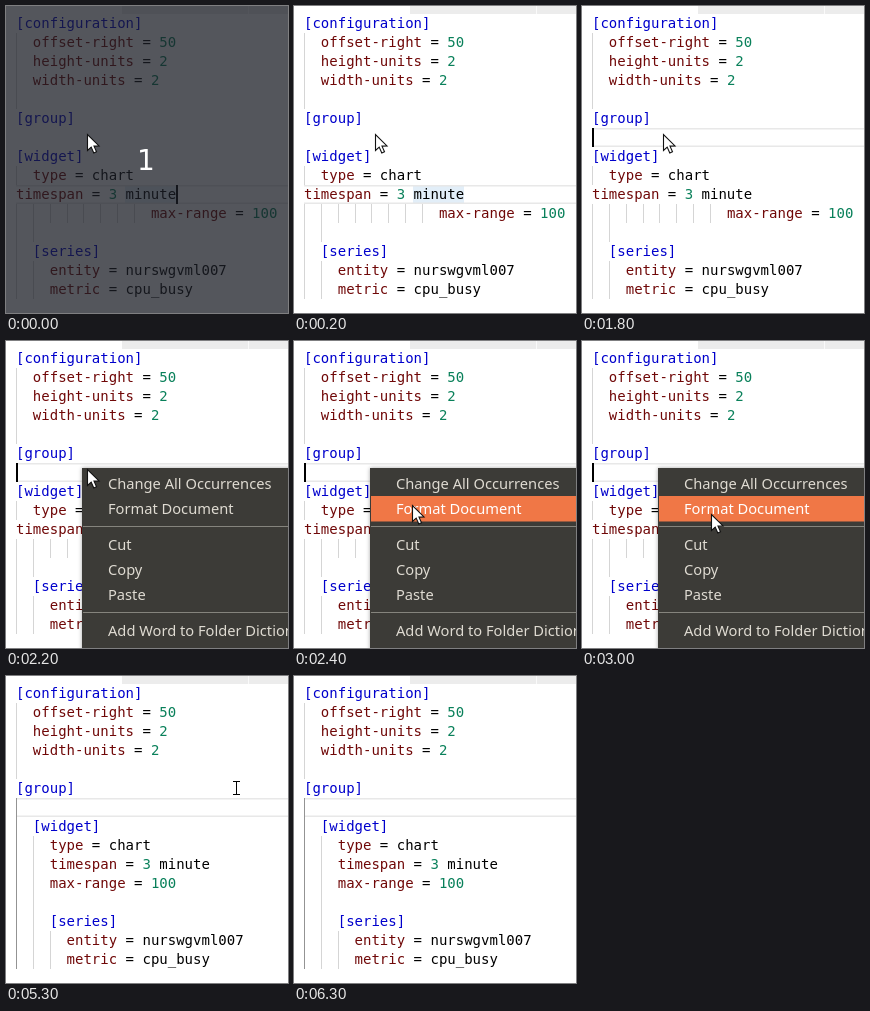
Recreate the animation shown at these times as an HTML page with a canvas. Size 282 by 307 pixels, loop 6600 ms.

```html
<!DOCTYPE html>
<html lang="en">
<head>
<meta charset="utf-8">
<title>Format document</title>
<style>
html, body { margin: 0; width: 100%; height: 100%; overflow: hidden; background: #fff; }
canvas { display: block; width: 282px; height: 307px; }
</style>
</head>
<body>
<canvas id="stage" width="282" height="307"></canvas>
<script>
const W = 282, H = 307, LOOP = 6600;
const LEFT = 10, TOP = 8, ROW = 19, CH = 8.43;
const MONO = '14px "DejaVu Sans Mono", monospace';
const MENU_FONT = '14.67px "Noto Sans", "Open Sans", sans-serif';
const BLUE = '#0000cc', KEY = '#700808', NUM = '#09805a', INK = '#000';
const GUIDE = '#d5d5d5', ACTIVE = '#939393';

const ctx = document.getElementById('stage').getContext('2d');

const head = ['[configuration]', '  offset-right = 50', '  height-units = 2', '  width-units = 2', '', '[group]', ''];
const body = ['[widget]', '  type = chart', '  timespan = 3 minute', '  max-range = 100', '',
  '  [series]', '    entity = nurswgvml007', '    metric = cpu_busy'];
const tidy = head.concat(body.map(s => s && '  ' + s));
const messy = head.concat(body);
messy[9] = 'timespan = 3 minute';
messy[10] = ' '.repeat(16) + 'max-range = 100';

const rowY = r => TOP + r * ROW;
const colX = c => LEFT + c * CH;

function rect(x, y, w, h, color) {
  ctx.fillStyle = color;
  ctx.fillRect(x, y, w, h);
}

function text(s, x, y, color) {
  ctx.fillStyle = color;
  ctx.fillText(s, x, y);
}

// Vertical rule at an indent level, covering rows a..b
function guide(level, a, b, color = GUIDE) {
  rect(Math.round(colX(level * 2)), rowY(a), 1, (b - a + 1) * ROW, color);
}

function drawGuides(formatted) {
  guide(0, 1, 4);
  if (formatted) {
    guide(0, 6, 14, ACTIVE);
    guide(1, 8, 14);
    guide(2, 13, 14);
  } else {
    guide(0, 8, 8);
    guide(0, 10, 14);
    guide(1, 10, 11);
    guide(1, 13, 14);
    for (let i = 2; i < 8; i++) guide(i, 10, 10);
  }
}

function drawLine(line, r) {
  const y = rowY(r) + 14;
  const start = line.search(/\S/);
  if (start < 0) return;
  if (line[start] === '[') {
    text(line.trim(), colX(start), y, BLUE);
    return;
  }
  const eq = line.indexOf('=');
  text(line.slice(start, eq - 1), colX(start), y, KEY);
  text('=', colX(eq), y, INK);
  const [, num, rest] = line.slice(eq + 2).match(/^(\d*)(.*)$/);
  text(num, colX(eq + 2), y, NUM);
  text(rest, colX(eq + 2 + num.length), y, INK);
}

function drawEditor(t) {
  const formatted = t >= 3800;
  const active = t < 1700 ? 9 : 6;
  rect(0, 0, W, H, '#fff');
  rect(116, 0, W - 116, TOP, '#ececec');
  rect(242, 0, 1, TOP, '#fafafa');
  if (t < 1800) rect(119, rowY(9) + 1, 51, ROW - 2, '#e2eef8');
  rect(LEFT, rowY(active), W - LEFT, 1.5, '#e8e8e8');
  rect(LEFT, rowY(active) + ROW - 1.5, W - LEFT, 1.5, '#e8e8e8');
  drawGuides(formatted);
  ctx.font = MONO;
  ctx.textAlign = 'left';
  (formatted ? tidy : messy).forEach(drawLine);
  if (caretOn(t)) rect(active === 9 ? 170 : LEFT, rowY(active), 2, ROW, INK);
}

function caretOn(t) {
  const flips = [200, 500, 1000, 1500, 4400, 4800, 5300, 5800, 6300];
  return flips.filter(f => t >= f).length % 2 === 0;
}

function drawMenu(hover) {
  ctx.save();
  ctx.shadowColor = 'rgba(0,0,0,.35)';
  ctx.shadowBlur = 4;
  rect(76, 127, W, H, '#3c3b37');
  ctx.restore();
  if (hover) rect(77, hover === 1 ? 130 : 155, W, 25.5, '#f07746');
  rect(77, 185, W, 1, '#85847d');
  rect(77, 271, W, 1, '#85847d');
  ctx.font = MENU_FONT;
  const items = [['Change All Occurrences', 148], ['Format Document', 173], ['Cut', 209], ['Copy', 234],
    ['Paste', 259], ['Add Word to Folder Dictionary', 295]];
  items.forEach(([s, y], i) => text(s, 102, y, i + 1 === hover ? '#fff' : '#dfdbd2'));
}

function arrow(x, y) {
  const pts = [[0, 0], [0, 16], [3.7, 12.6], [6.3, 18.4], [9, 17.2], [6.5, 11.6], [11.5, 11.4]];
  ctx.beginPath();
  pts.forEach(([dx, dy]) => ctx.lineTo(x + dx + .5, y + dy + .5));
  ctx.closePath();
  ctx.fillStyle = '#fff';
  ctx.fill();
  ctx.strokeStyle = '#111';
  ctx.lineWidth = 1.1;
  ctx.stroke();
}

function beam(x, y) {
  const parts = [[-3, -7, 7, 1], [0, -7, 1, 14], [-3, 6, 7, 1]];
  parts.forEach(([dx, dy, w, h]) => rect(x + dx - 1, y + dy - 1, w + 2, h + 2, '#fff'));
  parts.forEach(([dx, dy, w, h]) => rect(x + dx, y + dy, w, h, INK));
}

function drawPointer(t) {
  if (t < 2300) arrow(81, 128);
  else if (t < 2400) arrow(98, 144);
  else if (t < 2500) arrow(118, 164);
  else if (t < 3800) arrow(t < 3000 ? 128 : 129, 173);
  else if (t < 4000) beam(150, 189);
  else if (t >= 5300 && t < 5600) beam(230, 112 - 42 * Math.floor((t - 5300) / 100));
}

function drawCountdown() {
  rect(0, 0, W, H, 'rgba(27,30,38,.75)');
  ctx.font = '28px "DejaVu Sans", sans-serif';
  ctx.textAlign = 'center';
  text('1', 140, 164, '#fff');
}

function draw(t) {
  drawEditor(t);
  if (t >= 2200 && t < 3800) drawMenu(t < 2300 ? 0 : t < 2400 ? 1 : 2);
  if (t < 200) drawCountdown();
  drawPointer(t);
}

const begin = performance.now();
function tick() {
  draw((performance.now() - begin) % LOOP);
  requestAnimationFrame(tick);
}
tick();
</script>
</body>
</html>
```
